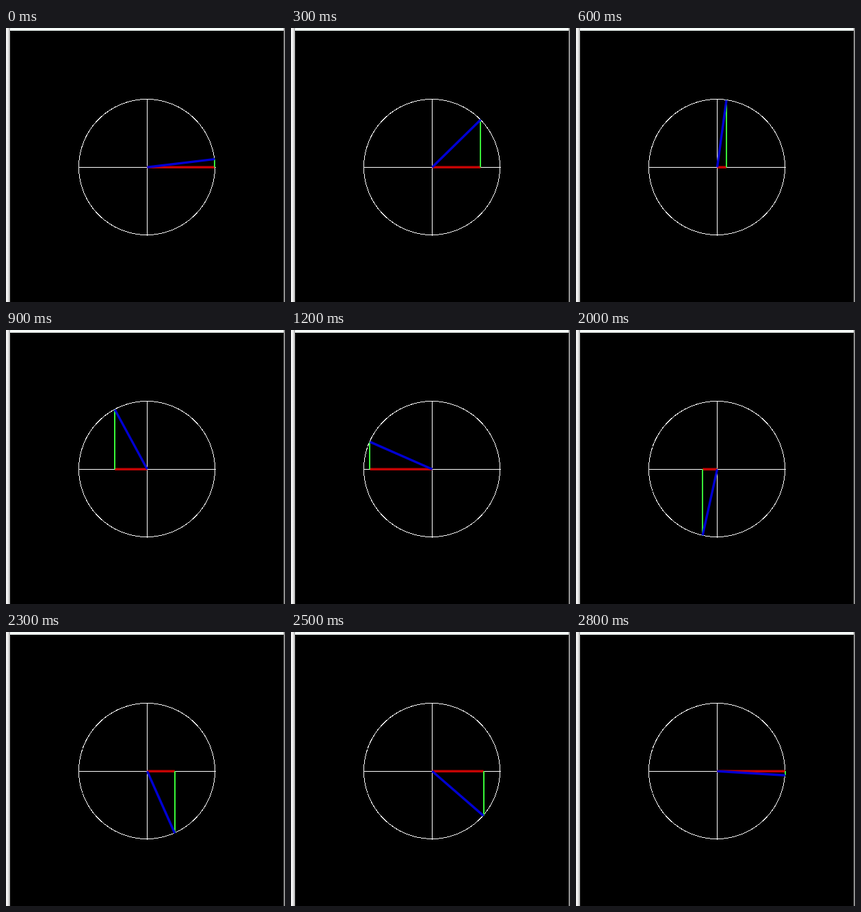
Write an HTML page that moves like this. It is 408 px wide and 402 px high and loops after 2.9 s.

```html
<!DOCTYPE html>
<html lang="en">
<head>
<meta charset="utf-8">
<title>Unit circle</title>
<style>
  html, body { margin: 0; width: 100%; height: 100%; overflow: hidden; background: #000; }
  svg { display: block; width: 408px; height: 402px; }
</style>
</head>
<body>
<svg viewBox="0 0 408 402">
  <defs>
    <linearGradient id="edge">
      <stop offset="0" stop-color="#fafafa"/>
      <stop offset=".5" stop-color="#ececec"/>
      <stop offset="1" stop-color="#a4a4a4"/>
    </linearGradient>
  </defs>
  <rect width="408" height="402"/>
  <rect width="408" height="4" fill="#f6fffc"/>
  <rect width="6" height="402" fill="url(#edge)"/>
  <rect x="406" width="2" height="402" fill="#909090"/>
  <g fill="none" stroke="#fff" shape-rendering="crispEdges">
    <circle cx="206" cy="204" r="99.5"/>
    <path d="M107 204.5H307M206.5 104V305"/>
  </g>
  <g fill="none">
    <path id="cos" stroke="#c40404" stroke-width="3.6"/>
    <path id="sin" stroke="#38f838" stroke-width="2"/>
    <path id="arm" stroke="#0000d2" stroke-width="3.4"/>
  </g>
</svg>
<script>
  const LOOP = 2900, STEP = 100, CX = 206.5, CY = 204.3, R = 99.5;
  // Step index and angle in degrees; the sweep is almost even.
  const KEYS = [[0, 6.9], [6, 82.2], [9, 118.4], [16, 206.6], [20, 257.6], [23, 293.9], [28, 356.6]];
  const [cos, sin, arm] = ["cos", "sin", "arm"].map(id => document.getElementById(id));

  function angleAt(step) {
    const i = Math.max(1, KEYS.findIndex(k => k[0] >= step));
    const [s0, a0] = KEYS[i - 1], [s1, a1] = KEYS[i];
    return (a0 + (a1 - a0) * (step - s0) / (s1 - s0)) * Math.PI / 180;
  }

  function draw(ms) {
    const a = angleAt(Math.floor(ms % LOOP / STEP));
    const x = CX + R * Math.cos(a), y = CY - R * Math.sin(a);
    const foot = Math.round(x);
    cos.setAttribute("d", `M${CX} ${CY}H${x}`);
    sin.setAttribute("d", `M${foot} ${CY}V${y}`);
    arm.setAttribute("d", `M${CX} ${CY}L${x} ${y}`);
  }

  const start = performance.now();
  function tick() {
    draw(performance.now() - start);
    requestAnimationFrame(tick);
  }
  tick();
</script>
</body>
</html>
```
